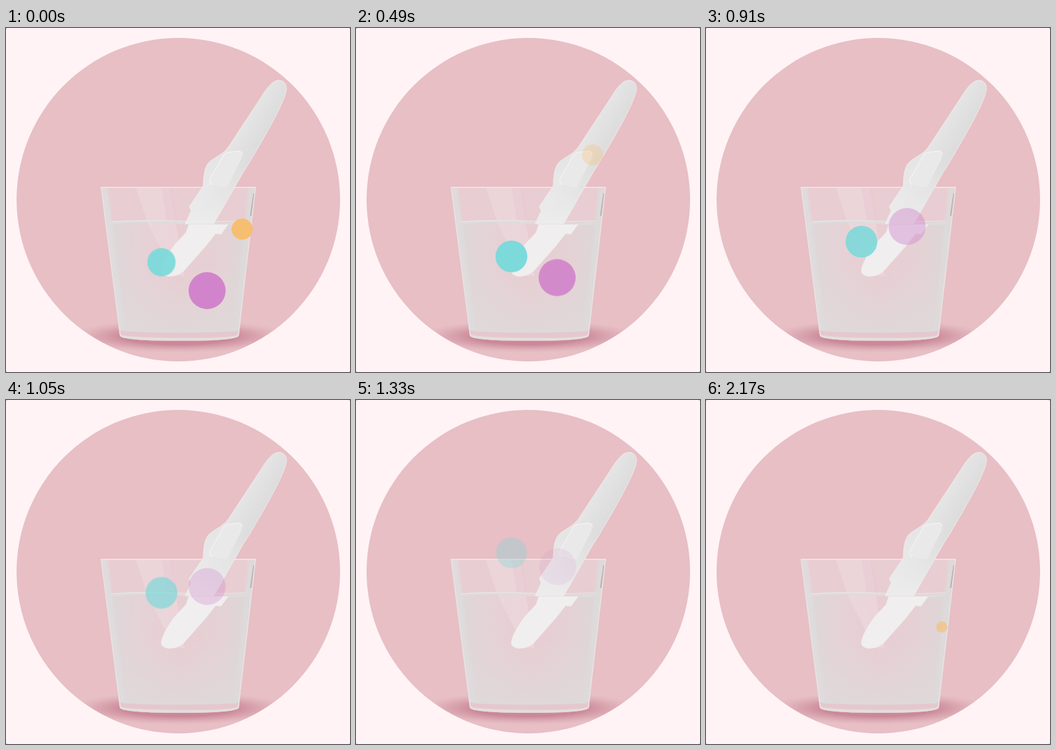
Write an HTML page without scripts that moves like this. It is 520 by 520 pixels and loops after 2240 ms.

```html
<!DOCTYPE html>
<html lang="en">
<head>
<meta charset="utf-8">
<title>Bubbles in a glass</title>
<style>
  html, body { margin: 0; width: 100%; height: 100%; overflow: hidden; background: #fff3f6; }
  svg { display: block; width: 100vw; height: 100vh; }

  /* One 70 ms tick is 3.125% of the loop; steps() holds each pose for a tick. */
  .bubble { animation: 2240ms steps(1) infinite; }
  .orange { fill: #f8bd6c; animation-name: orange; }
  .cyan { fill: #79d9da; animation-name: cyan; }
  .violet { fill: #d183cb; animation-name: violet; }

  @keyframes orange {
    0% { transform: translate(357px, 304px); opacity: .95; animation-timing-function: steps(5); }
    15.625% { transform: translate(357px, 228px); opacity: .52; animation-timing-function: steps(3); }
    25% { transform: translate(358px, 174px); opacity: .18; }
    31.25% { transform: translate(359px, 165px); opacity: .1; animation-timing-function: steps(3); }
    40.625% { transform: translate(360px, 154px); opacity: 0; }
    87.5% { transform: translate(357px, 353px) scale(.25); opacity: .35; }
    90.625% { transform: translate(357px, 353px) scale(.38); opacity: .45; }
    96.875%, 100% { transform: translate(356.5px, 343px) scale(.53); opacity: .6; }
  }
  @keyframes cyan {
    0% { transform: translate(235px, 354px) scale(.89); opacity: .92; animation-timing-function: steps(5); }
    15.625% { transform: translate(235px, 346px); opacity: .97; animation-timing-function: steps(3); }
    25% { transform: translate(235px, 345px); opacity: .97; }
    31.25% { transform: translate(235px, 343px); opacity: .97; animation-timing-function: steps(3); }
    40.625% { transform: translate(235px, 323px); opacity: .86; animation-timing-function: steps(4); }
    53.125% { transform: translate(235px, 260px); opacity: .48; animation-timing-function: steps(4); }
    65.625% { transform: translate(235px, 202px) scale(.94); opacity: .16; }
    87.5%, 100% { transform: translate(235px, 202px) scale(.94); opacity: 0; }
  }
  @keyframes violet {
    0% { transform: translate(304px, 397px); opacity: .98; animation-timing-function: steps(5); }
    15.625% { transform: translate(304px, 392px); opacity: .98; animation-timing-function: steps(3); }
    25% { transform: translate(304px, 370px); opacity: .88; }
    31.25% { transform: translate(304px, 339px); opacity: .68; animation-timing-function: steps(3); }
    40.625% { transform: translate(304px, 300px); opacity: .42; animation-timing-function: steps(4); }
    53.125% { transform: translate(304px, 264px); opacity: .19; animation-timing-function: steps(4); }
    65.625% { transform: translate(306px, 240px); opacity: .06; }
    87.5%, 100% { transform: translate(306px, 240px); opacity: 0; }
  }
</style>
</head>
<body>
<svg viewBox="0 0 520 520">
  <defs>
    <clipPath id="disc"><circle cx="260.5" cy="259.5" r="244.5"/></clipPath>
    <clipPath id="cup"><path d="M143 240H378L352 465Q348 473 262 473T172 465Z"/></clipPath>
    <radialGradient id="shade">
      <stop offset=".5" stop-color="#c67f90" stop-opacity=".85"/>
      <stop offset=".72" stop-color="#d196a3" stop-opacity=".6"/>
      <stop offset="1" stop-color="#deabb5" stop-opacity="0"/>
    </radialGradient>
    <linearGradient id="water">
      <stop offset="0" stop-color="#dcd8da"/>
      <stop offset=".2" stop-color="#e4d3d7"/>
      <stop offset=".5" stop-color="#e8cdd2"/>
      <stop offset=".8" stop-color="#e4d2d5"/>
      <stop offset="1" stop-color="#dad7d8"/>
    </linearGradient>
    <linearGradient id="depth" x2="0" y2="1">
      <stop offset=".4" stop-color="#dedada" stop-opacity="0"/>
      <stop offset="1" stop-color="#dedada" stop-opacity=".75"/>
    </linearGradient>
    <linearGradient id="plastic" gradientUnits="userSpaceOnUse" x1="350" y1="160" x2="378" y2="177">
      <stop offset="0" stop-color="#e6e5e5"/>
      <stop offset="1" stop-color="#dedddd"/>
    </linearGradient>
    <linearGradient id="sheen" gradientUnits="userSpaceOnUse" x1="0" y1="200" x2="0" y2="295">
      <stop offset="0" stop-color="#ececec" stop-opacity="0"/>
      <stop offset="1" stop-color="#ececec"/>
    </linearGradient>
    <filter id="soft"><feGaussianBlur stdDeviation="2"/></filter>
    <path id="handle" d="M404 82C412 76 425 79 424 93C422 110 396 156 374 193C370 200 366 207 358 219L314 296H271L280 276L277 270L298 239C299 229 298 211 308 202C316 195 328 191 336 180L386 104C392 94 398 86 404 82Z"/>
  </defs>

  <rect width="520" height="520" fill="#aaa6a8"/>
  <rect width="520" height="520" rx="2.5" fill="#fff3f6"/>
  <g clip-path="url(#disc)">
    <rect width="520" height="520" fill="#e7bfc5"/>
    <ellipse cx="261" cy="466" rx="168" ry="25" fill="url(#shade)"/>
  </g>

  <g clip-path="url(#cup)">
    <path d="M143 240H378V480H143Z" fill="#e8cdd2"/>
    <path d="M150 294Q260 289 372 294V459H150Z" fill="url(#water)"/>
    <path d="M150 294H372V459H150Z" fill="url(#depth)"/>
    <path d="M196 241H248L270 375L254 374L214 295Z" fill="#f0dde1" opacity=".5"/>
    <path d="M235 241H250L259 292H243Z" fill="#e7c6cc" opacity=".4"/>
    <path d="M154 296Q190 289 260 294T370 294" fill="none" stroke="#dddcdc" stroke-width="4"/>
    <path d="M154 293Q210 290 262 292T370 291" fill="none" stroke="#efe6e8"/>
    <g fill="none" filter="url(#soft)">
      <path d="M148 240L176 466" stroke="#dfdcdd" stroke-width="10"/>
      <path d="M372 240L348 466" stroke="#dedada" stroke-width="10"/>
    </g>
    <path d="M169 457Q262 464 355 457V475H168Z" fill="#e5c8ce"/>
    <path d="M177 457Q262 461 348 457" fill="none" stroke="#dcdadb" stroke-width="3"/>
    <path d="M172 465Q180 470 262 470.500T352 465" fill="none" stroke="#e3dedf" stroke-width="4"/>
    <path d="M375 250L370 284" stroke="#b9b5b6" stroke-width="2.500"/>
  </g>
  <path d="M144 241L173 465M377 241L351 465" fill="none" stroke="#e9e2e3" stroke-width="1.500"/>
  <path d="M143 241H378" stroke="#eee1e4" stroke-width="1.800"/>

  <use href="#handle" fill="url(#plastic)" stroke="#f0e9ea"/>
  <use href="#handle" fill="url(#sheen)"/>
  <path d="M336 188L352 186Q359 188 356 197L336 237Q332 243 325 241L312 237Q306 234 309 227L327 195Q330 189 336 188Z" fill="#eae9e9" stroke="#f3f1f1" stroke-width="1.500"/>
  <path d="M357 191L356 198L336 237Q332 243 325 241L312 237" fill="none" stroke="#d8d6d6" stroke-width=".8"/>
  <path d="M276 297H336L325 312L317 311L302 330L271 365C263 376 241 380 235 370C232 361 247 337 257 325L272 309Z" fill="#f0eeef"/>

  <circle class="bubble violet" r="28"/>
  <circle class="bubble cyan" r="24"/>
  <circle class="bubble orange" r="16"/>
</svg>
</body>
</html>
```
